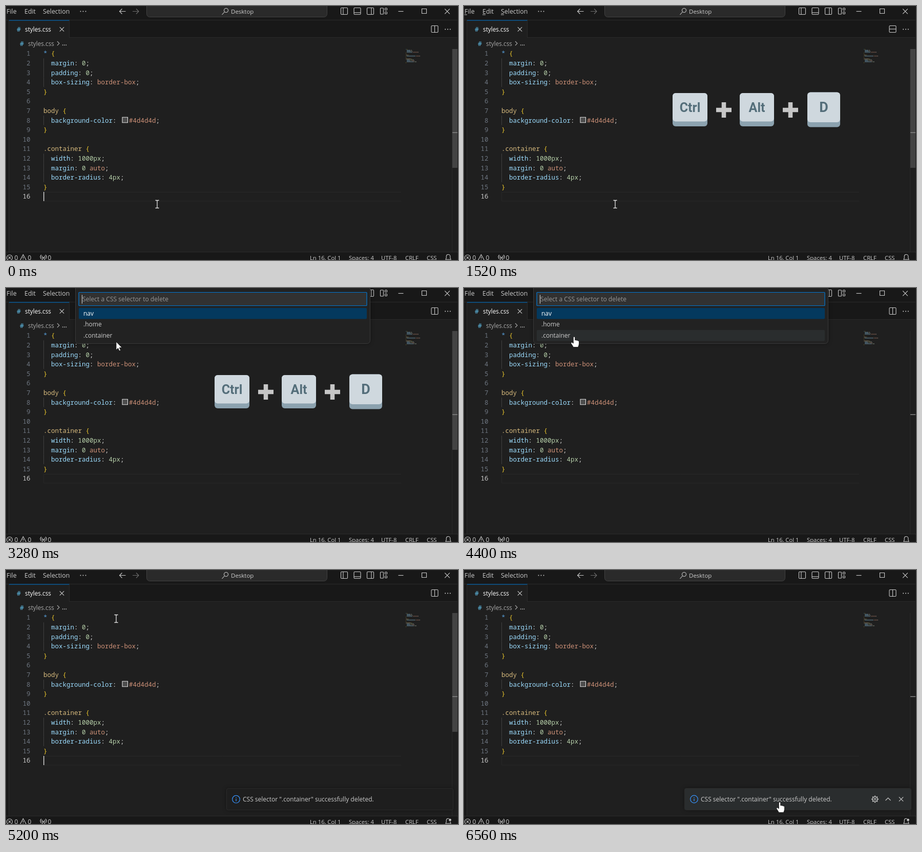
Write an HTML page with a canvas that moves like this. It is 882x496 px and loops after 6.64 s.

```html
<!DOCTYPE html>
<html lang="en">
<head>
<meta charset="utf-8">
<title>Delete a CSS selector</title>
<style>
html, body { margin: 0; width: 100%; height: 100%; overflow: hidden; background: #1f1f1f; }
canvas { display: block; }
</style>
</head>
<body>
<canvas id="stage" width="882" height="496"></canvas>
<script>
const ctx = document.getElementById('stage').getContext('2d');
const LOOP = 6640, STEP = 80;
const UI = '"Open Sans", "Noto Sans", sans-serif';
const MONO = '"Noto Sans Mono", monospace';
const KEYCAP = 'Roboto, sans-serif';
const LINE = 18.6, CHAR = 7.5, CODE_X = 73, FIRST_Y = 93;

// Event times in ms
const KEYS_ON = 960, KEYS_OFF = 4000, ALT_DOWN = 1200, ALT_UP = 2320;
const PICK_OPEN = 2000, PICK_CLOSE = 4880, TOAST = 4960;

const COLORS = { s: '#d7ba7d', w: '#569cd6', b: '#ecc72c', p: '#9cdcfe', n: '#b5cea8', v: '#ce9178', t: '#d4d4d4' };
const rule = (name, value, kind) => [['p', '  ' + name], ['t', ': '], [kind, value], ['t', ';']];
const open = (selector, kind = 's') => [[kind, selector + ' '], ['b', '{']];
const close = [['b', '}']];
const code = [
  open('*', 'w'), rule('margin', '0', 'n'), rule('padding', '0', 'n'), rule('box-sizing', 'border-box', 'v'), close, [],
  open('body'), rule('background-color', '#4d4d4d', 'v'), close, [],
  open('.container'), rule('width', '1000px', 'n'),
  [['p', '  margin'], ['t', ': '], ['n', '0 '], ['v', 'auto'], ['t', ';']],
  rule('border-radius', '4px', 'n'), close, []
];

const between = (t, from, to) => t >= from && t < to;
const ramp = (t, from, to) => Math.min(1, Math.max(0, (t - from) / (to - from)));

function rect(x, y, w, h, color) {
  ctx.fillStyle = color;
  ctx.fillRect(x, y, w, h);
}

function text(str, x, y, size, color = '#cccccc', family = UI, align = 'left', weight = 400) {
  ctx.font = `${weight} ${size}px ${family}`;
  ctx.textAlign = align;
  ctx.fillStyle = color;
  ctx.fillText(str, x, y);
}

function box(x, y, w, h, radius, fill, stroke, width = 1) {
  ctx.beginPath();
  ctx.roundRect(x, y, w, h, radius);
  if (fill) { ctx.fillStyle = fill; ctx.fill(); }
  if (stroke) { ctx.strokeStyle = stroke; ctx.lineWidth = width; ctx.stroke(); }
}

function path(x, y, d, stroke = '#cccccc', width = 1.1, fill) {
  ctx.save();
  ctx.translate(x, y);
  const shape = new Path2D(d);
  if (fill) { ctx.fillStyle = fill; ctx.fill(shape); }
  if (stroke) { ctx.strokeStyle = stroke; ctx.lineWidth = width; ctx.stroke(shape); }
  ctx.restore();
}

function circle(x, y, r, stroke, width = 1.1, fill) {
  ctx.beginPath();
  ctx.arc(x, y, r, 0, 7);
  if (fill) { ctx.fillStyle = fill; ctx.fill(); }
  if (stroke) { ctx.strokeStyle = stroke; ctx.lineWidth = width; ctx.stroke(); }
}

function dots(x, y, gap, color) {
  for (const i of [-1, 0, 1]) circle(x + i * gap, y, 1, null, 0, color);
}

function shadowed(draw) {
  ctx.save();
  ctx.shadowColor = 'rgba(0,0,0,.4)';
  ctx.shadowBlur = 9;
  draw();
  ctx.restore();
}

const cross = (x, y, r) => path(x, y, `M${-r} ${-r}L${r} ${r}M${r} ${-r}L${-r} ${r}`);
const frameIcon = (x, y, inner) => {
  box(x - 6.5, y - 6.5, 13, 13, 1.5, null, '#cccccc', 1.1);
  path(x, y, inner);
};

function drawTitleBar(alt) {
  rect(0, 0, 882, 27, '#181818');
  rect(0, 27, 882, 1, '#2b2b2b');
  [['File', 1, 5], ['Edit', 36, 6], ['Selection', 72, 6]].forEach(([label, x, w]) => {
    text(label, x, 14.7, 12.4);
    if (alt) rect(x, 16.5, w, 1, '#cccccc');
  });
  dots(150.5, 10.5, 5, '#cccccc');
  path(227.5, 10.5, 'M6 0H-6M-1 -5L-6 0L-1 5');
  path(253, 10.5, 'M-6 0H6M1 -5L6 0L1 5', '#6c6c6c');
  box(274.5, -6.5, 352, 28, 6, '#2a2a2a', '#414141');
  circle(429.5, 8.5, 4, '#cccccc');
  path(426.5, 11.5, 'M0 0L-5 5.5');
  text('Desktop', 439, 14.8, 11.5);

  frameIcon(660, 10, 'M-2 -6.5V6.5');
  frameIcon(685.5, 10, 'M-6.5 3H6.5');
  frameIcon(711, 10, 'M2 -6.5V6.5');
  box(730.5, 4, 6, 12, 1, null, '#cccccc', 1.1);
  box(739.5, 4, 4, 4, 1, null, '#cccccc', 1.1);
  box(739.5, 11.5, 4, 4, 1, null, '#cccccc', 1.1);
  path(770.5, 10.5, 'M-5 0H5');
  box(811.5, 5.5, 9, 9, 0, null, '#cccccc', 1.1);
  cross(861, 10.5, 4.8);
}

function drawTabs(alt) {
  rect(0, 28, 882, 34, '#181818');
  rect(124, 61, 758, 1, '#2b2b2b');
  rect(6, 27, 118, 35, '#1f1f1f');
  rect(6, 27.5, 118, 1, '#0078d4');
  rect(123, 28, 1, 34, '#2b2b2b');
  text('#', 21, 49.5, 13, '#519aba', MONO, 'left', 700);
  text('styles.css', 37, 49.8, 11.8, '#ffffff');
  cross(109, 45.5, 4.2);
  frameIcon(836.5, 45, alt ? 'M-6.5 0H6.5' : 'M0 -6.5V6.5');
  dots(862, 45.5, 4.8, '#cccccc');
  text('#', 27, 77.5, 13, '#519aba', MONO, 'left', 700);
  text('styles.css', 43, 77.5, 11.8, '#a9a9a9');
  path(100, 73, 'M0 -4L4 0L0 4', '#a9a9a9');
  dots(114, 76.3, 3.3, '#a9a9a9');
}

function drawCode(caretOn) {
  const lastY = FIRST_Y + 15 * LINE;
  box(73.5, lastY - 8.5, 698, 17.5, 0, null, '#282828');
  rect(771, lastY - 10, 2, 21, '#1f1f1f');
  code.forEach((tokens, row) => {
    const y = FIRST_Y + row * LINE;
    text(row + 1, 47.5, y + 4.3, 12.5, row === 15 ? '#cccccc' : '#6e7681', MONO, 'right');
    let col = 0, shift = 0;
    for (const [kind, str] of tokens) {
      if (str[0] === '#') {
        box(227, y - 6, 10.5, 10.5, 0, '#4d4d4d', '#e4e4e4', 1.1);
        shift = 17;
      }
      text(str, CODE_X + col * CHAR + shift, y + 4.3, 12.5, COLORS[kind], MONO, 'left', 500);
      const indent = str.length - str.trimStart().length;
      ctx.globalAlpha = 0.45;
      rect(780 + col + indent, 84 + row * 1.87, str.trim().length, 1.2, COLORS[kind]);
      ctx.globalAlpha = 1;
      col += str.length;
    }
    if (tokens.length > 2) rect(73, y - LINE / 2, 1, LINE, '#404040');
  });
  if (caretOn) rect(73, lastY - 9, 1.5, 18, '#d0d0d0');
}

function drawScrollbar(opacity) {
  rect(870, 84, 1, 397, '#292929');
  rect(871, 84, 10, 232, `rgba(121,121,121,${0.4 * opacity})`);
  rect(871, 246.5, 10, 1.5, '#858585');
  rect(881, 0, 1, 496, '#151515');
}

function drawStatusBar(unread) {
  rect(0, 481, 882, 15, '#181818');
  rect(0, 480, 882, 1, '#2b2b2b');
  circle(7, 491.5, 5.5, '#cccccc');
  cross(7, 491.5, 2.3);
  path(33.5, 491, 'M0 -5.5L6 5.5H-6ZM0 -1.5V2M0 3.2V4.2');
  path(73, 491, 'M-4 -5Q-8 -1 -4 3M4 -5Q8 -1 4 3M-2 -3Q-4 -1 -2 1M2 -3Q4 -1 2 1M0 -1L-3 6M0 -1L3 6');
  [16.5, 42.5, 81.5].forEach(x => text('0', x, 495.7, 12));
  [['Ln 16, Col 1', 593], ['Spaces: 4', 669], ['UTF-8', 732], ['CRLF', 779], ['CSS', 821]]
    .forEach(([label, x]) => text(label, x, 495.7, 11.3));
  path(863, 491, 'M-5 4H5L3.8 1V-2C3.8 -7 -3.8 -7 -3.8 -2V1Z');
  if (unread) circle(866.5, 488, 2.8, '#181818', 1, '#cccccc');
}

function drawKey(label, x, y, w, h, size) {
  box(x, y, w, h, 6, '#8ca2af');
  box(x, y, w, h - 9.5, 6, '#cfd8de');
  text(label, x + w / 2, 207, size, '#546e7a', KEYCAP, 'center', 700);
}

function drawShortcut() {
  drawKey('Ctrl', 407, 170, 68, 65, 25);
  drawKey('Alt', 538, 170, 67, 65, 25);
  drawKey('D', 670, 168.5, 64, 68, 27);
  for (const x of [507, 637]) path(x, 203, 'M-15 0H15M0 -15V15', '#c6c6c6', 8.5);
}

function drawPicker(caretOn, hover) {
  shadowed(() => box(135.5, -8.5, 575, 117, 6, '#222222'));
  box(135.5, -8.5, 575, 117, 6, null, '#3a3a3a');
  box(142, 8.5, 562, 26, 1, '#313131', '#0078d4', 1.2);
  text('Select a CSS selector to delete', 149, 26.3, 12.1, '#989898');
  if (caretOn) rect(148, 13.5, 1, 17, '#e0e0e0');
  box(142, 39, 562, 21.5, 2, '#04395e');
  if (hover) box(142, 82, 562, 21.5, 2, '#2a2d2e');
  text('nav', 151, 53.8, 12, '#ffffff');
  text('.home', 151, 75.3, 12);
  text('.container', 151, 96.9, 12);
}

function drawToast(progress, hover) {
  const eased = 1 - (1 - progress) ** 2;
  ctx.save();
  ctx.beginPath();
  ctx.rect(420, 380, 462, 100);
  ctx.clip();
  ctx.globalAlpha = eased;
  ctx.translate(0, 43 * (1 - eased));
  shadowed(() => box(430.5, 426.5, 442, 42, 3, hover ? '#2a2d2e' : '#1f1f1f'));
  box(430.5, 426.5, 442, 42, 3, null, '#2d2d2d');
  circle(449, 447.5, 7.3, '#3794ff', 1.2);
  path(449, 447.5, 'M0 -3.8V-2.2M0 -0.8V3.8', '#3794ff', 1.3);
  text('CSS selector ".container" successfully deleted.', 462, 451.8, 12);
  if (hover) {
    circle(802, 447.5, 4.8, '#cccccc', 1.2);
    circle(802, 447.5, 1.9, '#cccccc');
    for (let i = 0; i < 8; i++) {
      const a = i * Math.PI / 4, c = Math.cos(a), s = Math.sin(a);
      path(802, 447.5, `M${5 * c} ${5 * s}L${6.8 * c} ${6.8 * s}`, '#cccccc', 2);
    }
    path(827.5, 447.5, 'M-5 2.5L0 -2.5L5 2.5');
    cross(853, 447.5, 4.2);
  }
  ctx.restore();
}

const CURSORS = {
  beam: (x, y) => path(x, y, 'M-3.5 -7.5H-1Q0 -7.5 0 -6.5V6.5Q0 7.5 -1 7.5H-3.5M3.5 -7.5H1Q0 -7.5 0 -6.5M3.5 7.5H1Q0 7.5 0 6.5', '#e6e6e6', 1.3),
  arrow: (x, y) => path(x, y, 'M0 0V16L3.7 12.5L6 17.8L8.6 16.7L6.3 11.5H11.3Z', '#111111', 0.8, '#ffffff'),
  hand: (x, y) => path(x, y, 'M-1.7 1Q0 -1 1.7 1V7Q3 5.8 4.5 7.3Q6.3 6.4 7.2 8Q9.3 7.5 9.5 9.5V14Q9.3 17 7.5 20.5H-1.5Q-3.5 17 -6 13.5Q-7 11 -4.5 11L-1.7 13Z', '#111111', 0.8, '#ffffff')
};

const MOUSE = [
  [0, 295, 387], [2640, 295, 387], [3280, 215, 105], [3440, 215, 95],
  [5200, 215, 95], [5840, 474, 379], [6480, 616, 453], [LOOP, 616, 453]
];

function mouseAt(t) {
  const i = MOUSE.findIndex(k => k[0] > t);
  const [t0, x0, y0] = MOUSE[i - 1], [t1, x1, y1] = MOUSE[i];
  const u = ramp(t, t0, t1), e = u * u * (3 - 2 * u);
  return [x0 + (x1 - x0) * e, y0 + (y1 - y0) * e];
}

const blink = (t, start) => (t - start) % 1000 < 500;

function scrollbarOpacity(t) {
  if (t < PICK_CLOSE) return 1 - ramp(t, 3480, 4320);
  return Math.min(0.06 + ramp(t, PICK_CLOSE, 5040), 1 - ramp(t, 5840, 6520));
}

function draw(t) {
  const alt = between(t, ALT_DOWN, ALT_UP);
  const picking = between(t, PICK_OPEN, PICK_CLOSE);
  const [mx, my] = mouseAt(t);
  const onToast = t >= TOAST && mx > 431 && my > 426;
  const onRow = picking && my < 103;
  const editorCaret = !picking && blink(t, t < PICK_OPEN ? -200 : PICK_CLOSE);

  rect(0, 0, 882, 496, '#1f1f1f');
  drawTitleBar(alt);
  drawTabs(alt);
  drawCode(editorCaret);
  rect(0, 28, 5, 453, '#181818');
  rect(5, 28, 1, 453, '#2b2b2b');
  drawScrollbar(scrollbarOpacity(t));
  drawStatusBar(t >= PICK_CLOSE);
  if (picking) drawPicker(blink(t, PICK_OPEN), onRow);
  if (t >= TOAST) drawToast(ramp(t, TOAST - STEP / 2, TOAST + 260), onToast);
  if (between(t, KEYS_ON, KEYS_OFF)) drawShortcut();
  const cursor = onToast || onRow ? 'hand' : picking && my < 109 ? 'arrow' : 'beam';
  CURSORS[cursor](mx, my);
}

function tick() {
  draw(Math.floor(performance.now() % LOOP / STEP) * STEP);
  requestAnimationFrame(tick);
}
tick();
</script>
</body>
</html>
```
